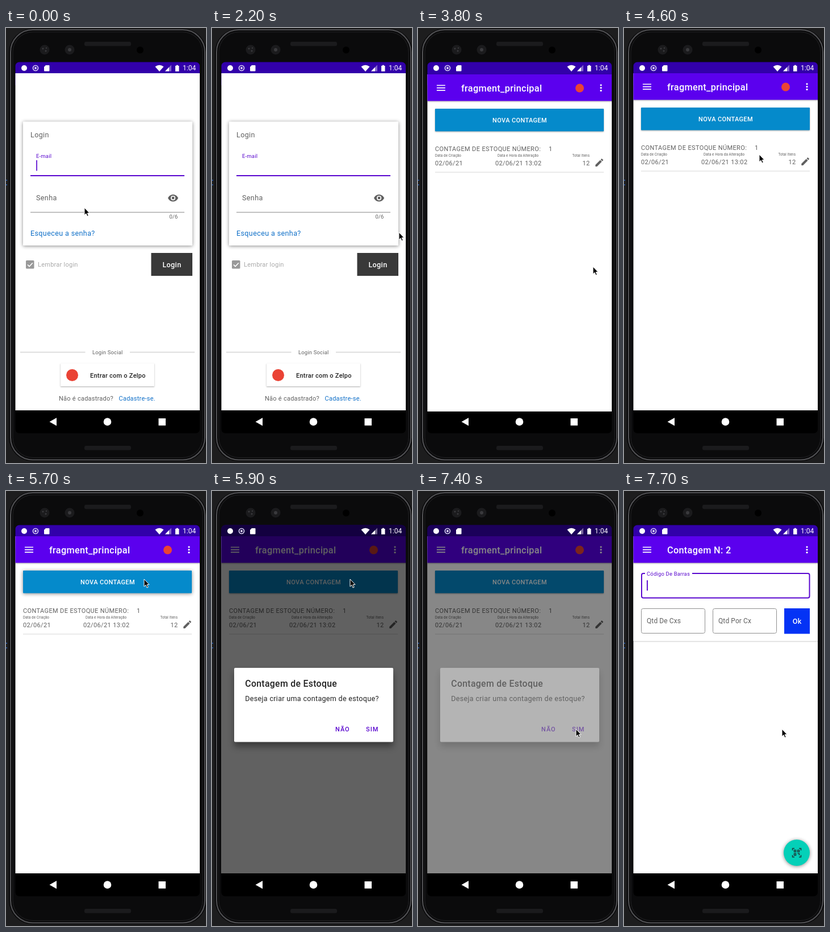
An HTML page that plays this animation: 352x760 px, repeating every 8000 ms.

```html
<!DOCTYPE html>
<html lang="pt">
<head>
<meta charset="utf-8">
<title>Login e contagem</title>
<style>
html, body { margin: 0; width: 100%; height: 100%; overflow: hidden; background: #1d1d1e; }
svg { display: block; width: 352px; height: 760px; font-family: Roboto, sans-serif; fill: #606060; }
.xs { font-size: 6.3px; letter-spacing: .1px; }
.s { font-size: 9.43px; letter-spacing: .2px; }
.m { font-size: 11px; letter-spacing: .25px; }
.caps { font-size: 11px; letter-spacing: .37px; }
.l { font-size: 12.57px; letter-spacing: .37px; }
.h { font-size: 16.3px; letter-spacing: .3px; }
.b { font-weight: 500; }
.mid { text-anchor: middle; }
.end { text-anchor: end; }
.w { fill: #fff; }
.link { fill: #1070c8; }
.p { fill: #5a08cf; }
.btn { font-size: 11px; letter-spacing: 1px; font-weight: 500; }
.field { font-size: 12px; letter-spacing: .1px; }
.up0 { filter: drop-shadow(0 1px 1.2px #0003); }
.up1 { filter: drop-shadow(0 1px 1.2px #0005); }
.up2 { filter: drop-shadow(0 1px 3px #0007); }
.up3 { filter: drop-shadow(0 8px 6px #0006); }
</style>
</head>
<body>
<svg viewBox="0 0 352 760">
  <defs>
    <clipPath id="screen"><rect x="16.500" y="59.500" width="324.500" height="648.500" rx="7"/></clipPath>
    <g id="bar">
      <rect class="up1" x="16" y="79" width="326" height="46.500" fill="#5b00ee"/>
      <path d="M33 98.300H48M33 102.600H48M33 106.900H48" stroke="#fff" stroke-width="1.600"/>
      <g class="w"><circle cx="322" cy="97.800" r="1.600"/><circle cx="322" cy="102.600" r="1.600"/><circle cx="322" cy="107.400" r="1.600"/></g>
    </g>
  </defs>

  <!-- phone body -->
  <rect x="5" y="1" width="348" height="756" rx="42" fill="#0a0a0b"/>
  <rect x="8" y="3" width="342" height="751.500" rx="39" fill="#0b0b0c" stroke="#525255" stroke-width="2"/>
  <rect x="12" y="7" width="334" height="743.500" rx="35" fill="#0b0b0c" stroke="#232325"/>
  <g fill="#1b1b1d">
    <rect x="138" y="24" width="82" height="7.500" rx="3"/>
    <rect x="138" y="730" width="82" height="7.500" rx="3"/>
    <circle cx="68" cy="38" r="8.500"/><circle cx="112" cy="38" r="8.500"/>
  </g>
  <g fill="#3a3a3d">
    <circle cx="65" cy="36" r="1.500"/><circle cx="70" cy="40" r="1.500"/>
    <circle cx="71" cy="35" r="1.200"/><circle cx="112" cy="38" r="3"/>
  </g>
  <circle cx="236" cy="38.500" r="6" fill="#000"/>
  <path d="M0 266H2M0 274H2" stroke="#2a66c4" stroke-width="1.500"/>

  <g clip-path="url(#screen)">
    <rect x="16" y="59" width="326" height="649" fill="#000"/>
    <rect x="16" y="59" width="326" height="41" fill="#3200aa"/>

    <g id="login">
      <rect x="16" y="79" width="326" height="589" class="w"/>
      <rect class="w up2" x="30" y="163.500" width="298" height="216.500" rx="1"/>
      <text class="l" x="43" y="191">Login</text>
      <text class="s p" x="53" y="227">E-mail</text>
      <rect id="caret" class="p" x="53.200" y="231" width="1.700" height="18.500"/>
      <rect class="p" x="43" y="257" width="271" height="2"/>
      <text class="l" x="53" y="301.300">Senha</text>
      <path transform="translate(284.200 287.200) scale(.82)" d="M12 4.500C7 4.500 2.730 7.610 1 12c1.730 4.390 6 7.500 11 7.500s9.270-3.110 11-7.500c-1.730-4.390-6-7.500-11-7.500zM12 17a5 5 0 1 1 0-10 5 5 0 0 1 0 10zm0-8a3 3 0 1 0 0 6 3 3 0 0 0 0-6z"/>
      <rect x="43" y="321.500" width="271" height="1" fill="#868686"/>
      <text class="s" x="287.500" y="333">0/6</text>
      <text class="l link" x="43" y="363">Esqueceu a senha?</text>
      <rect x="35" y="406" width="14.500" height="14.500" rx="1.500" fill="#999"/>
      <path d="M38 413.500l3 3 5.800-6" fill="none" stroke="#fff" stroke-width="1.600"/>
      <text class="m" x="56" y="417.300" fill="#aaa">Lembrar login</text>
      <rect x="255.500" y="393" width="72.500" height="40" fill="#393939"/>
      <text class="l b w mid" x="292" y="418">Login</text>
      <path d="M25 566.500H139.500M218 566.500H332" stroke="#ddd" stroke-width="2"/>
      <text class="s mid" x="178.700" y="570">Login Social</text>
      <rect class="w up1" x="96" y="586" width="165" height="40"/>
      <circle cx="116.500" cy="606.500" r="10.500" fill="#ea4335"/>
      <text class="m b" x="148" y="610.500" fill="#222">Entrar com o Zelpo</text>
      <text class="m" x="93" y="651.300">Não é cadastrado?</text>
      <text class="m link" x="198.500" y="651.300">Cadastre-se.</text>
    </g>

    <g id="list">
      <rect x="16" y="79" width="326" height="589" class="w"/>
      <use href="#bar"/>
      <text class="h b w" x="76" y="108.800">fragment_principal</text>
      <circle cx="284.500" cy="103" r="7.500" fill="#ea4335"/>
      <rect id="add" class="up1" x="30" y="139" width="297" height="39.500" rx="1" fill="#058acb"/>
      <text class="caps b w mid" x="179" y="163">NOVA CONTAGEM</text>
      <text class="caps" x="30" y="212.800">CONTAGEM DE ESTOQUE NÚMERO:</text>
      <text class="caps" x="230" y="212.800">1</text>
      <text class="xs" x="30" y="223">Data de Criação</text>
      <text class="xs" x="140" y="223">Data e Hora da Alteração</text>
      <text class="xs end" x="302" y="223">Total Itens</text>
      <text class="caps" x="30" y="237.500">02/06/21</text>
      <text class="caps" x="136" y="237.500">02/06/21 13:02</text>
      <text class="caps end" x="302.500" y="237.500">12</text>
      <path transform="translate(310 224) scale(.76)" d="M3 17.250V21h3.750L17.810 9.940l-3.750-3.750zM20.710 7.040a1 1 0 0 0 0-1.410l-2.340-2.340a1 1 0 0 0-1.410 0l-1.830 1.830 3.750 3.750z"/>
      <rect x="30" y="249.500" width="297" height="1" fill="#d8d8d8"/>
    </g>

    <g id="count">
      <rect x="16" y="79" width="326" height="589" class="w"/>
      <rect class="w up0" x="16" y="120" width="326" height="142"/>
      <use href="#bar"/>
      <text class="h b w" x="76" y="108.800">Contagem N: 2</text>
      <rect x="31" y="144" width="295.500" height="42.700" rx="3" fill="#fff" stroke="#5a08cf" stroke-width="2"/>
      <rect x="37" y="141" width="83" height="6" class="w"/>
      <text class="s p" x="40" y="148">Código De Barras</text>
      <rect class="p" x="40" y="156" width="1.900" height="18"/>
      <g fill="#fff" stroke="#909090">
        <rect x="30.500" y="205.500" width="112" height="43" rx="3"/>
        <rect x="156.500" y="205.500" width="112" height="43" rx="3"/>
      </g>
      <text class="field" x="40" y="231">Qtd De Cxs</text>
      <text class="field" x="166" y="231">Qtd Por Cx</text>
      <rect x="282" y="205" width="45" height="44.500" fill="#0433f5"/>
      <text class="l b w mid" x="304.700" y="231.500">Ok</text>
      <circle class="up2" cx="304" cy="632" r="23" fill="#04d0b8"/>
      <g fill="none" stroke="#1d3a3a" stroke-width="1.400">
        <path d="M296.500 628V624.500H300M308 624.500H311.500V628M311.500 636V639.500H308M300 639.500H296.500V636"/>
        <path d="M299.500 627.500h3v3h-3zM305.500 627.500h3v3h-3zM299.500 633.500h3v3h-3zM305.500 633.500h3v3"/>
      </g>
    </g>

    <rect id="dim" x="16" y="59" width="326" height="649" fill="#000"/>
    <g id="dialog">
      <rect class="w up3" x="39" y="309" width="280" height="129.500" rx="2"/>
      <text class="b" x="58.300" y="342" fill="#222" font-size="15.800" letter-spacing=".32">Contagem de Estoque</text>
      <text x="58.300" y="367" fill="#222" font-size="12.570" letter-spacing=".3">Deseja criar uma contagem de estoque?</text>
      <text class="btn p" x="217" y="420">NÃO</text>
      <text class="btn p" x="271" y="420">SIM</text>
    </g>
  </g>

  <!-- status and navigation icons -->
  <g class="w">
    <circle cx="32" cy="70" r="5"/>
    <circle cx="52" cy="70" r="4.500" fill="none" stroke="#d9d3f2" stroke-width="1.700"/>
    <circle cx="52" cy="70" r="2" fill="#d9d3f2"/>
    <path d="M70 65h5.500a1 1 0 0 1 1 1v8.500a1 1 0 0 1-1 1H68a1 1 0 0 1-1-1V68z"/>
    <path d="M262.500 67.500Q270 62 277.500 67.500L270 76z"/>
    <path d="M291 64.500V75.500H280z" opacity=".4"/>
    <path d="M287 68.500V75.500H280z"/>
    <path d="M298 66h1.800v-1.200h2.900V66h1.800v9.700H298z"/>
    <text x="311" y="74.300" font-size="12">1:04</text>
    <path d="M76.500 688L89 681V695z"/>
    <circle cx="178.500" cy="688" r="6.800"/>
    <rect x="268.500" y="682" width="12.500" height="12.500"/>
  </g>

  <path id="mouse" d="M0 0V13l3-2.800 2 4.800 2.200-.9-2-4.700H9z" fill="#000" stroke="#fff"/>
</svg>
<script>
const $ = id => document.getElementById(id);
const show = (id, on) => $(id).style.display = on ? '' : 'none';

// time, x, y
const path = [
  [1800, 138, 314], [1900, 160, 317], [2000, 225, 332], [2200, 329, 357],
  [2400, 322, 413], [2500, 317, 432], [2700, 309, 420], [2800, 308, 417],
  [4100, 308, 417], [4200, 283, 355], [4300, 258, 292], [4400, 245, 255],
  [4600, 238, 221], [4700, 238, 221], [5000, 240, 178], [5300, 243, 154],
  [6000, 243, 154], [6200, 247, 195], [6500, 268, 350], [6800, 278, 416]
];
const dims = [[5700, 0], [5800, .3], [5900, .62], [7300, .62], [7400, .47], [7500, .12], [7600, 0]];
const panel = [[5700, 0], [5800, .5], [5900, 1], [7300, 1], [7400, .38], [7500, 0]];
const slide = [[3700, 8], [3800, 2], [3900, 0]];

function at(keys, t, i = 1) {
  if (t <= keys[0][0]) return keys[0][i];
  const n = keys.findIndex(k => k[0] > t);
  if (n < 0) return keys[keys.length - 1][i];
  const a = keys[n - 1], b = keys[n];
  return a[i] + (b[i] - a[i]) * (t - a[0]) / (b[0] - a[0]);
}

function draw(ms) {
  const t = Math.floor(ms % 8000 / 100) * 100;
  show('login', t < 3700);
  show('list', t >= 3700 && t < 7600);
  show('count', t >= 7600);
  show('caret', Math.floor((t + 300) / 500) % 2 === 0);
  $('list').setAttribute('transform', `translate(0 ${at(slide, t)})`);
  $('add').setAttribute('class', t >= 5700 && t < 5900 ? 'up2' : 'up1');
  $('dim').setAttribute('opacity', at(dims, t));
  $('dialog').setAttribute('opacity', at(panel, t));
  $('mouse').setAttribute('transform', `translate(${at(path, t)} ${at(path, t, 2)})`);
}

const start = performance.now();
function loop(now) {
  draw(Math.max(0, now - start));
  requestAnimationFrame(loop);
}
draw(0);
requestAnimationFrame(loop);
</script>
</body>
</html>
```
